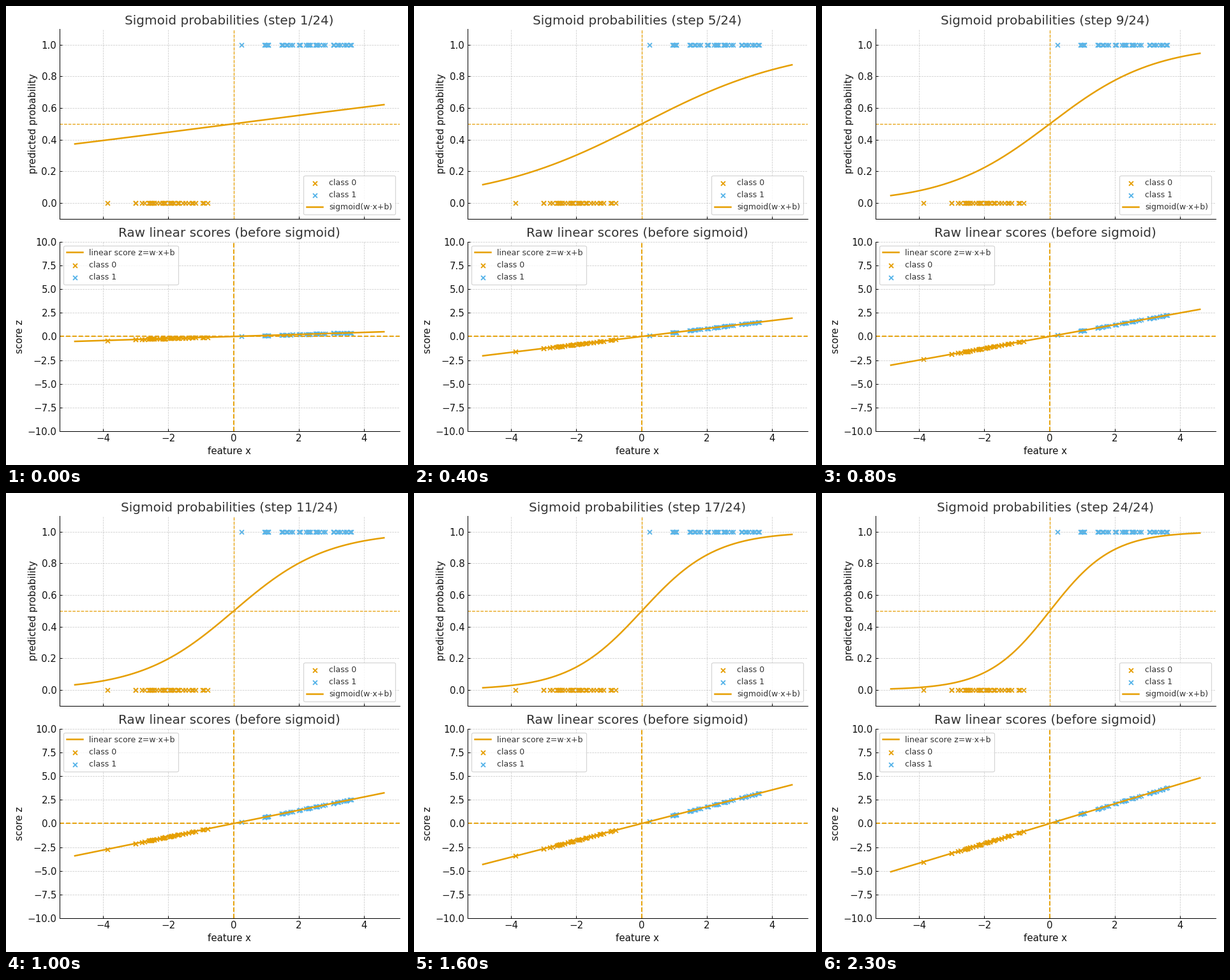
A matplotlib script that plays this animation: 630x720 px, repeating every 2400 ms.

```python
import numpy as np
import matplotlib.pyplot as plt
from matplotlib.animation import FuncAnimation

ORANGE, BLUE = "#E69F00", "#56B4E9"
STEPS, RATE = 24, 0.1

plt.rcParams.update({
    "font.family": "DejaVu Sans",
    "axes.titlesize": 16,
    "axes.labelsize": 12,
    "xtick.labelsize": 12,
    "ytick.labelsize": 12,
    "legend.fontsize": 10,
    "xtick.direction": "in",
    "ytick.direction": "in",
    "axes.spines.top": False,
    "axes.spines.right": False,
    "axes.grid": True,
    "grid.linestyle": "--",
    "grid.color": "#b0b0b0",
    "grid.alpha": 0.7,
    "grid.linewidth": 0.6,
    "axes.titlecolor": "#333333",
    "axes.labelcolor": "#111111",
    "xtick.labelcolor": "#111111",
    "ytick.labelcolor": "#111111",
})


def sigmoid(z):
    return 1 / (1 + np.exp(-z))


def train(x, y):
    """Gradient descent on the logistic loss; (w, b) after each step."""
    w = b = 0.0
    path = []
    for _ in range(STEPS):
        err = sigmoid(w * x + b) - y
        w -= RATE * np.mean(err * x)
        b -= RATE * np.mean(err)
        path.append((w, b))
    return path


rng = np.random.default_rng(0)
x0 = rng.normal(-2, 0.8, 40)
x1 = rng.normal(2, 0.8, 40)
x = np.concatenate([x0, x1])
y = np.repeat([0, 1], 40)
path = train(x, y)
xs = np.linspace(x.min() - 1, x.max() + 1, 200)

fig, (top, low) = plt.subplots(2, 1, figsize=(7, 8), dpi=90, sharex=True)


def crosses(ax, px, py, color, label):
    return ax.scatter(px, py, s=30, marker="x", color=color, label=label)


crosses(top, x0, np.zeros(40), ORANGE, "class 0")
crosses(top, x1, np.ones(40), BLUE, "class 1")
curve, = top.plot(xs, sigmoid(0 * xs), color=ORANGE, lw=2, label="sigmoid(w·x+b)")
top.axhline(0.5, color=ORANGE, ls="--", lw=1)
top.axvline(0, color=ORANGE, ls="--", lw=1)
top.set_ylim(-0.1, 1.1)
top.set_ylabel("predicted probability")
title = top.set_title(f"Sigmoid probabilities (step 1/{STEPS})")
top.legend(loc="lower right", labelcolor="#333333")

line, = low.plot(xs, 0 * xs, color=ORANGE, lw=2, label="linear score z=w·x+b")
dots = [crosses(low, x0, 0 * x0, ORANGE, "class 0"),
        crosses(low, x1, 0 * x1, BLUE, "class 1")]
low.axhline(0, color=ORANGE, ls="--", lw=1.5)
low.axvline(0, color=ORANGE, ls="--", lw=1.5)
low.set_ylim(-10, 10)
low.set_xlabel("feature x")
low.set_ylabel("score z")
low.set_title("Raw linear scores (before sigmoid)")
low.legend(loc="upper left", labelcolor="#333333")

fig.tight_layout()


def update(i):
    w, b = path[i]
    z = w * xs + b
    curve.set_ydata(sigmoid(z))
    line.set_ydata(z)
    for pts, px in zip(dots, (x0, x1)):
        pts.set_offsets(np.column_stack([px, w * px + b]))
    title.set_text(f"Sigmoid probabilities (step {i + 1}/{STEPS})")
    return curve, line, *dots, title


anim = FuncAnimation(fig, update, frames=STEPS, interval=100, repeat=True)
plt.show()
```
